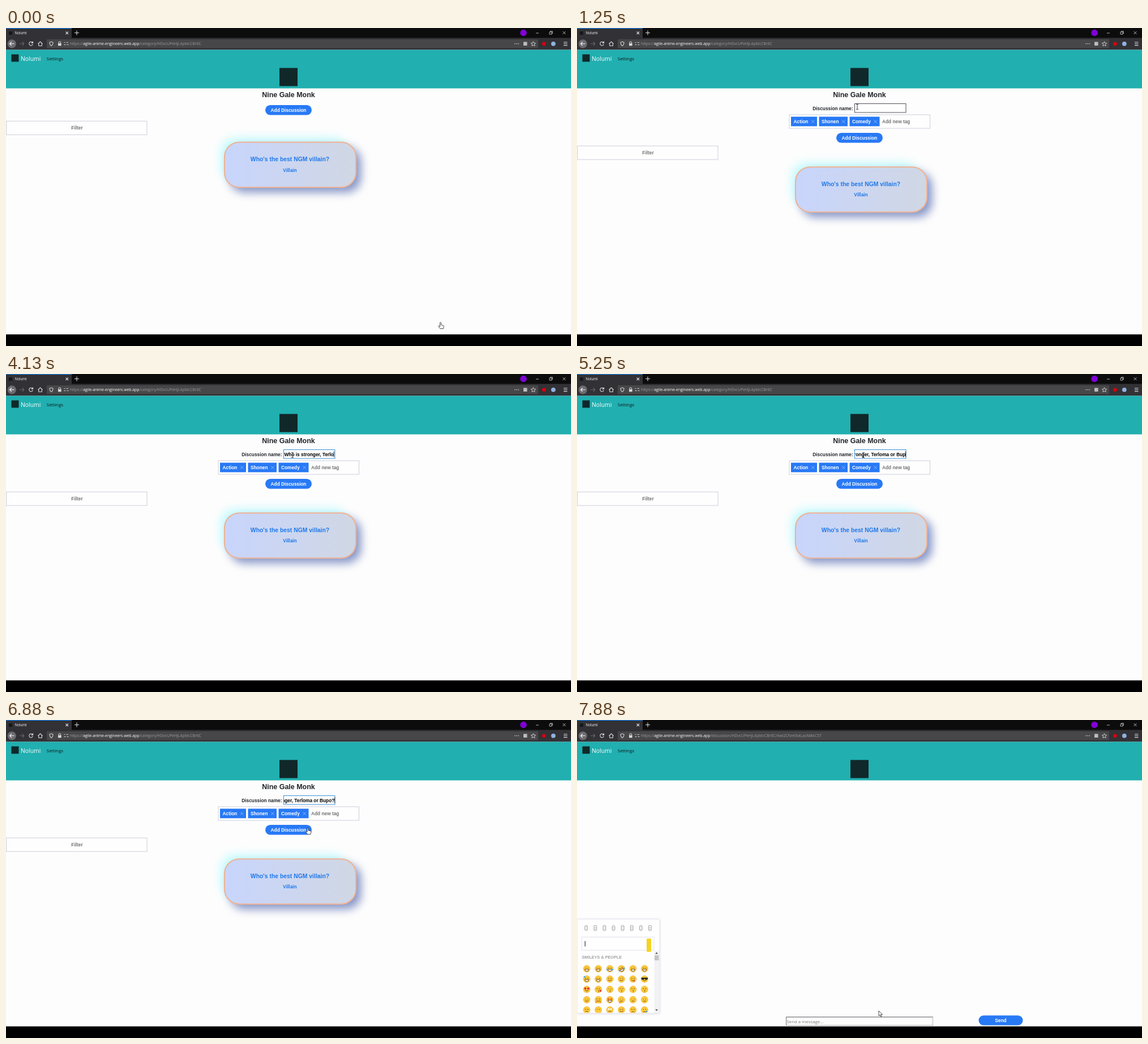
An HTML page for the animation above (8000 ms loop, 998 by 561 pixels).

```html
<!DOCTYPE html>
<html lang="en">
<head>
<meta charset="utf-8">
<title>Nolumi</title>
<style>
  html, body { margin: 0; width: 100%; height: 100%; overflow: hidden; background: #000; }
  svg { display: block; width: 998px; height: 561px; }
  text { white-space: pre; }
  .b { font: bold 8.32px "Liberation Sans", Arial, sans-serif; fill: #212529; }
  .u { font: 6.8px "Open Sans", "Noto Sans", sans-serif; fill: #9a9a9f; }
  .mid { text-anchor: middle; }
  .w { fill: #fff; }
  .grey { fill: #757575; }
  .link { fill: #1f78ea; }
  .blue { fill: #2879f5; }
  .ico { fill: none; stroke: #d8d8da; stroke-width: 1.1; }
  .box { fill: #fefefe; stroke: #cdcfdc; }
  .glow { filter: blur(8px); }
</style>
</head>
<body>
<svg viewBox="0 0 998 561">
  <defs>
    <linearGradient id="card"><stop stop-color="#c8d5fc"/><stop offset="1" stop-color="#d0d7e4"/></linearGradient>
    <clipPath id="field"><rect x="491" y="134" width="90.5" height="15"/></clipPath>
    <clipPath id="list"><rect x="1" y="426" width="135" height="90.5"/></clipPath>
  </defs>

  <rect width="998" height="541" fill="#fdfdfd"/>

  <!-- browser -->
  <rect width="998" height="18" fill="#0c0c0d"/>
  <rect width="116" height="18" fill="#323236"/>
  <rect width="116" height="1" fill="#0a84ff"/>
  <rect y="17.5" width="998" height="21" fill="#323236"/>
  <rect x="72" y="20" width="868" height="15.5" rx="1" fill="#474749"/>
  <rect x="5" y="6" width="6" height="6" fill="#17181a"/>
  <text class="u w" x="15.5" y="11.4" style="font-size:6.2px">Nolumi</text>
  <circle cx="914" cy="8.5" r="5.8" fill="#8000d7"/>
  <circle cx="10.3" cy="27.8" r="7.6" fill="#6b6b70"/>
  <g class="ico">
    <path d="M105.500 6.500l4.500 4.500m0-4.500l-4.500 4.500M125 4.500v8m-4-4h8"/>
    <path d="M6.500 27.800h8m-8 0l3.300-3.300m-3.300 3.300l3.300 3.300" stroke="#fff"/>
    <path d="M24 27.800h8m0 0l-3.300-3.300m3.300 3.300l-3.300 3.300" stroke="#68686c"/>
    <path d="M47 26a3.300 3.300 0 1 0 .3 2.500M47.500 23.500v3h-3"/>
    <path d="M56.500 28l4-4 4 4M57.800 27.500v4h5.400v-4"/>
    <path d="M80 24.300l3 1c0 3.500-1 5-3 6.300c-2-1.300-3-2.800-3-6.300z"/>
    <path d="M93 27v-1.200a1.800 1.800 0 0 1 3.600 0V27"/>
    <path d="M102.500 25.800h2m2 0h3.500M102.500 29.500h3m2 0h3"/>
    <path d="M931.500 23.800l1.200 2.700 2.900.3-2.200 1.900.7 2.900-2.600-1.500-2.600 1.500.7-2.900-2.200-1.900 2.900-.3z" stroke-width=".9"/>
    <path d="M985 25h6.500m-6.500 2.800h6.500m-6.500 2.800h6.500"/>
    <path d="M936 9h5M960 7h4v4h-4zM961.500 7V5.700h3.800v3.800H964M983.500 6l5 5m0-5l-5 5" stroke-width=".8"/>
  </g>
  <rect x="92" y="27" width="5.600" height="4.300" fill="#d8d8da"/>
  <path d="M899 27.800h.1m3 0h.1m3 0h.1" stroke="#d8d8da" stroke-width="1.600" stroke-linecap="round"/>
  <rect x="914" y="24.500" width="6.500" height="6.500" fill="#bcbcc0"/>
  <circle cx="950.300" cy="27.800" r="3.400" fill="#d8000f"/>
  <circle cx="966.800" cy="27.800" r="3.900" fill="#8fb2e0"/>
  <text class="u" x="113" y="30.300">https://<tspan class="w">agile-anime-engineers.web.app</tspan><tspan id="path"></tspan></text>

  <!-- site header -->
  <rect y="38.500" width="998" height="68" fill="#21afb0"/>
  <rect x="9.500" y="46.500" width="13" height="13" fill="#10282a"/>
  <rect x="483" y="70.500" width="32" height="32" fill="#10282a"/>
  <text class="u w" x="26" y="57.700" style="font-size:10.400px">Nolumi</text>
  <text class="u" x="71.800" y="56.600" style="font-size:7.900px;fill:#101818">Settings</text>

  <!-- category page -->
  <g id="category">
    <text class="b mid" x="499" y="122.300" style="font-size:12.480px">Nine Gale Monk</text>
    <g id="form">
      <text class="b" x="416.300" y="144.500">Discussion name:</text>
      <rect id="name" x="490.500" y="133.500" width="90.500" height="15.500" fill="#fefefe"/>
      <g clip-path="url(#field)">
        <text class="b" id="typed" y="144.500" style="fill:#000"></text>
        <rect id="caret" y="136.500" width=".9" height="10" fill="#000"/>
      </g>
      <rect class="box" x="375" y="153" width="248.500" height="24"/>
      <g id="tags"></g>
      <text class="b grey" x="539" y="167.800">Add new tag</text>
    </g>
    <g id="lower">
      <g id="add">
        <rect class="blue" x="458" y="136" width="82" height="17.500" rx="8.750"/>
        <text class="b w mid" x="499" y="147.800">Add Discussion</text>
      </g>
      <g id="rest">
        <rect class="box" x=".5" y="164.300" width="248.500" height="24"/>
        <text class="b grey mid" x="125.500" y="179.200">Filter</text>
        <rect class="glow" x="379" y="194" width="225" height="76" rx="26" fill="#c4fbff"/>
        <rect class="glow" x="395" y="210" width="232" height="80" rx="26" fill="#8594c6"/>
        <rect x="386" y="201.500" width="232" height="79.500" rx="26" fill="url(#card)" stroke="#efb293" stroke-width="2.100"/>
        <text class="b link mid" x="501.500" y="235.300" style="font-size:10.400px">Who's the best NGM villain?</text>
        <text class="b link mid" x="501.500" y="253.600">Villain</text>
      </g>
    </g>
  </g>

  <!-- discussion page -->
  <g id="chat">
    <rect x="0" y="352" width="146" height="166" fill="#d5d5e6" style="filter:blur(2px)"/>
    <rect x=".5" y="351.500" width="145" height="165.500" fill="#fefefe" stroke="#ebebf3"/>
    <g id="groups" fill="none" stroke="#96969c" stroke-width=".9"></g>
    <rect id="search" x="8.500" y="383" width="127.500" height="23" fill="#fff"/>
    <rect x="13.700" y="390" width="1" height="9.500" fill="#111"/>
    <rect x="123" y="385.500" width="8" height="23.500" rx="1.500" fill="#f6d321"/>
    <text class="b" x="8.500" y="421.200" style="font-size:7.280px;fill:#a0a0a4">SMILEYS &amp; PEOPLE</text>
    <rect x="136.500" y="407" width="8.500" height="109.500" fill="#f1f1f6"/>
    <rect x="137" y="415" width="7.500" height="9" fill="#c3c3c8"/>
    <path d="M138.300 412.500l2.300-2.800 2.300 2.800zM138.300 510.500l2.300 2.800 2.300-2.800z" fill="#444"/>
    <g id="faces" clip-path="url(#list)"></g>
    <rect x="369.500" y="524" width="259" height="14.500" fill="#fefefe" stroke="#b9b9bd"/>
    <path d="M369.500 538.500V524H628.500" fill="none" stroke="#77777b"/>
    <text class="u grey" x="370.500" y="534.800" style="font-size:7.800px">Send a message...</text>
    <rect class="blue" x="709.500" y="521.300" width="78" height="17.300" rx="8.650"/>
    <text class="b w mid" x="748.500" y="533">Send</text>
  </g>

  <rect y="540.500" width="998" height="21"/>

  <g id="pointer" stroke-linejoin="round">
    <path id="arrow" d="M0 0v9l2.100-1.900 1.500 3.400 1.500-.7-1.500-3.200h2.900z" fill="#fff" stroke="#222" stroke-width=".8"/>
    <path id="hand" d="M-1 .8q1-1.600 2 0v4l4 .9q1 .4.900 1.600l-.9 4.200h-5.500l-3-4q0-1.600 1.500-.6l1 .9z" fill="#fff" stroke="#222" stroke-width=".8"/>
    <path id="beam" d="M-2-4.500h1.500l.5.500.5-.5H2M0-4v8M-2 4.500h1.500l.5-.5.500.5H2" fill="none" stroke="#222" stroke-width=".9"/>
  </g>
</svg>
<script>
const $ = id => document.getElementById(id);
const show = (id, on) => $(id).style.display = on ? '' : 'none';
const shift = (id, x, y) => $(id).setAttribute('transform', `translate(${x} ${y})`);

const LOOP = 8000, TICK = 125;
const OPEN = 1125, FOCUS = 1500, ENTER = 7125, FACES = 7375;
const QUESTION = 'Who is stronger, Terloma or Bupo?';
const CODE = 'HDvcUPeHjL4pbtcCBr6C';

// time, x, y of the pointer's hot spot
const PATH = [
  [0, 767.5, 519], [125, 767.5, 519], [875, 497, 143], [1125, 497, 143],
  [1250, 495, 139], [1500, 506, 143], [5625, 506, 143], [6250, 543.5, 184],
  [6500, 533, 190], [7250, 533, 190], [7875, 533, 513]
];

$('tags').innerHTML = [['Action', 378, 46], ['Shonen', 427.5, 50.5], ['Comedy', 481.5, 53]].map(([word, x, w]) => `
  <rect class="blue" x="${x}" y="156.500" width="${w}" height="16.800"/>
  <text class="b w" x="${x + 4.5}" y="167.800">${word}</text>
  <path d="M${x + w - 10} 162.300l5.400 5.400m0-5.400l-5.400 5.400" stroke="#9cc3ff" stroke-width=".8"/>`).join('');

$('groups').innerHTML = Array.from({ length: 8 }, (_, i) => {
  const x = 16.2 + i * 16.1;
  return `<rect x="${x - 2.4}" y="362.500" width="4.800" height="9" rx="${i % 3 ? 1.5 : 2.4}"/>
    <path d="M${x - 1} ${365 + i % 2}h2M${x - 1} 369h2"/>`;
}).join('');

const DOTS = '<path d="M-2-1.500v.8M2-1.500v.8" stroke-width="1.300"/>';
const ARCS = '<path d="M-3.200-.8q1.100-1.600 2.200 0M1-.8q1.100-1.600 2.200 0"/>';
const DASH = '<path d="M-3.200-1.200h2.200M1-1.200h2.200"/>';
const GRIN = '<path d="M-3.500 1h7q-.8 3.600-3.500 3.600t-3.500-3.600z" fill="#fff"/>';
const SMILE = '<path d="M-3 1.600q3 2.800 6 0"/>';
const KISS = '<path d="M0 1.200q1.800.8 0 1.500q1.800.7 0 1.400"/>';
const FLAT = '<path d="M-2.500 2.500h5"/>';
const FROWN = '<path d="M-2.500 3.700q2.500-2.500 5 0"/>';
const blob = (x, y, r, c) => `<circle cx="${x}" cy="${y}" r="${r}" fill="${c}" stroke="none"/>`;
const TEARS = blob(-4.5, 1.5, 1.5, '#4fa9e8') + blob(4.5, 1.5, 1.5, '#4fa9e8');
const HEARTS = blob(-2.6, -1.5, 2, '#e6333f') + blob(2.6, -1.5, 2, '#e6333f');
const LOOKS = {
  g: DOTS + GRIN, l: ARCS + GRIN, j: ARCS + GRIN + TEARS,
  r: `<g transform="rotate(-25)">${ARCS + GRIN + TEARS}</g>`,
  d: ARCS + GRIN + blob(-4, -4, 1.6, '#4fa9e8'),
  s: DOTS + SMILE, b: ARCS + SMILE, w: DASH + SMILE,
  y: ARCS + SMILE + blob(2, 3.3, 1.2, '#e6505a'),
  c: '<path d="M-5.500-2h11l-1 2.800h-3l-1-1.800h-1l-1 1.800h-3z" fill="#222" stroke="#222"/>' + SMILE,
  h: HEARTS + SMILE, x: DASH + KISS + blob(3.8, 2.5, 1.8, '#e6333f'),
  k: DOTS + KISS, m: ARCS + KISS,
  u: ARCS + SMILE + blob(-3.8, 4.3, 1.9, '#f0a51c') + blob(3.8, 4.3, 1.9, '#f0a51c'),
  a: blob(-2.5, -1.3, 1.9, '#f07a24') + blob(2.5, -1.3, 1.9, '#f07a24') + GRIN,
  t: DOTS + FLAT + blob(-2.6, 4.5, 1.9, '#f0a51c'),
  n: DOTS + FLAT, e: DASH + FLAT, o: DOTS,
  v: blob(-2, -1.5, 1.5, '#fff') + blob(2, -1.5, 1.5, '#fff') + FLAT,
  f: ARCS + FROWN, z: DOTS + FROWN + blob(3.8, 2.5, 1.4, '#4fa9e8')
};
$('faces').innerHTML = [...'gljrgldlwbychxkmmmsuatnneovwfz'].map((look, i) => {
  const x = 17.2 + i % 6 * 20.42, y = 438.8 + Math.floor(i / 6) * 18.2;
  return `<g transform="translate(${x} ${y})" fill="none" stroke="#6b3d12" stroke-width=".9">
    <circle r="6" fill="#fbca3c" stroke="#efaa2e" stroke-width=".6"/>${LOOKS[look]}</g>`;
}).join('');

function pointerAt(t) {
  let i = 1;
  while (i < PATH.length - 1 && PATH[i][0] < t) i++;
  const [t0, x0, y0] = PATH[i - 1], [t1, x1, y1] = PATH[i];
  const p = Math.min(1, (t - t0) / (t1 - t0)), e = p * p * (3 - 2 * p);
  return [x0 + (x1 - x0) * e, y0 + (y1 - y0) * e];
}

function pointerKind(t, x, y, form) {
  if (t >= ENTER) return 'arrow';
  const top = form ? 185 : 136;
  if (t < TICK || x > 458 && x < 540 && y > top && y < top + 17.5) return 'hand';
  return form && x > 490 && x < 581 && y > 133 && y < 150 ? 'beam' : 'arrow';
}

function typeName(t) {
  const count = Math.round(10 + (t / TICK - 22) * 1.05);
  const text = $('typed');
  text.textContent = QUESTION.slice(0, Math.max(0, count));
  const width = text.getComputedTextLength();
  const x = Math.min(491.5, 580.3 - width);
  text.setAttribute('x', x);
  $('caret').setAttribute('x', x + width);
  show('caret', t >= FOCUS);
  $('name').setAttribute('stroke', t >= FOCUS ? '#3d92d6' : '#50505a');
}

function draw() {
  const t = Math.floor(performance.now() % LOOP / TICK) * TICK;
  const form = t >= OPEN, chat = t >= ENTER;
  show('category', !chat);
  show('chat', chat);
  show('form', form);
  $('path').textContent = chat ? `/discussion/${CODE}/4wt2CNre0skLacMAkC57` : `/category/${CODE}`;
  shift('add', 0, form ? 49 : 0);
  shift('rest', 0, form ? 43.7 : 0);
  if (form && !chat) typeName(t);
  show('faces', t >= FACES);
  $('search').setAttribute('stroke', t >= FACES ? '#e2e2ea' : '#f4f4f8');
  const [x, y] = pointerAt(t), kind = pointerKind(t, x, y, form);
  shift('pointer', x, y);
  for (const id of ['arrow', 'hand', 'beam']) show(id, id === kind);
  requestAnimationFrame(draw);
}
draw();
</script>
</body>
</html>
```
